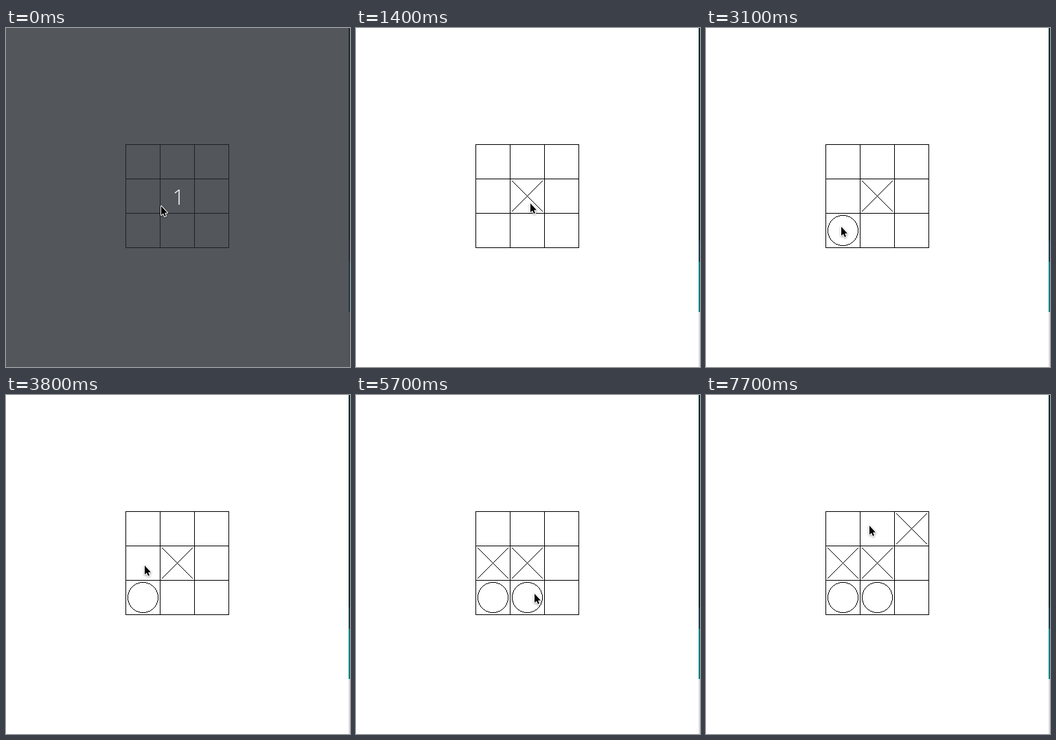
An HTML page with a canvas for the animation above (8 s loop, 501 by 493 pixels).

```html
<!DOCTYPE html>
<html lang="en">
<head>
<meta charset="utf-8">
<title>Noughts and crosses</title>
<style>
html, body { margin: 0; width: 100%; height: 100%; overflow: hidden; background: #fff; }
canvas { display: block; width: 501px; height: 493px; }
</style>
</head>
<body>
<canvas id="stage" width="501" height="493"></canvas>
<script>
const ctx = document.getElementById('stage').getContext('2d');
const LOOP = 8000, STEP = 100, INTRO = 100;
const LEFT = 174, TOP = 169, CELL = 50, REACH = 22;

// Pointer glides: start and end time, then where it comes to rest
const glides = [
  { from: 0, to: 0, x: 226, y: 259 },
  { from: 100, to: 500, x: 254, y: 255 },
  { from: 1800, to: 2300, x: 197, y: 289 },
  { from: 3400, to: 3800, x: 202, y: 248 },
  { from: 4800, to: 4900, x: 235, y: 269 },
  { from: 5000, to: 5400, x: 260, y: 289 },
  { from: 5900, to: 6500, x: 304, y: 193 },
  { from: 7300, to: 7700, x: 238, y: 190 }
];

// Cells are numbered row by row; crosses and noughts take turns
const moves = [
  { at: 1400, cell: 4 }, { at: 3100, cell: 6 }, { at: 4400, cell: 3 },
  { at: 5700, cell: 7 }, { at: 6900, cell: 2 }
];

const arrow = new Path2D('M0 0V13L3 10.4L5 15L7 14.2L5.1 9.7H9Z');

function box(color, x, y, w, h) {
  ctx.fillStyle = color;
  ctx.fillRect(x, y, w, h);
}

function dot(x, y) {
  ctx.fillRect(x, y, 1, 1);
}

function grid() {
  for (let i = 0; i < 4; i++) {
    box('#000', LEFT + i * CELL, TOP, 1, 3 * CELL + 1);
    box('#000', LEFT, TOP + i * CELL, 3 * CELL + 1, 1);
  }
}

function cross(cx, cy) {
  for (let i = -REACH; i <= REACH; i++) {
    dot(cx + i, cy + i);
    dot(cx + i, cy - i);
  }
}

// One-pixel circle without smoothing
function nought(cx, cy) {
  for (let a = 0; ; a++) {
    const b = Math.round(Math.sqrt(REACH * REACH - a * a));
    if (a > b) break;
    for (const sx of [-1, 1]) for (const sy of [-1, 1]) {
      dot(cx + sx * a, cy + sy * b);
      dot(cx + sx * b, cy + sy * a);
    }
  }
}

// Sliver of the desktop beside the window
function edge() {
  box('#dcdcdc', 499, 0, 2, 493);
  box('#008080', 499, 0, 2, 413);
  box('#1f3f4f', 499, 0, 2, 340);
  box('#03302f', 499, 0, 2, 309);
}

function countdown() {
  box('rgba(38,41,48,.79)', 0, 0, 501, 493);
  ctx.fillStyle = '#fff';
  ctx.font = '300 31px "Open Sans", "Noto Sans", sans-serif';
  ctx.fillText('1', 242.5, 257);
}

// The pointer moves in whole time steps
function pointerAt(t) {
  const now = Math.floor(t / STEP) * STEP;
  let { x, y } = glides[0];
  for (const g of glides.slice(1)) {
    const k = Math.min(1, Math.max(0, (now - g.from) / (g.to - g.from)));
    x += (g.x - x) * k;
    y += (g.y - y) * k;
  }
  return [x, y];
}

function pointer(x, y) {
  ctx.save();
  ctx.translate(x, y);
  ctx.lineWidth = 2;
  ctx.lineJoin = 'round';
  ctx.strokeStyle = '#fff';
  ctx.shadowColor = 'rgba(0,0,0,.4)';
  ctx.shadowBlur = 3;
  ctx.shadowOffsetY = 1;
  ctx.stroke(arrow);
  ctx.shadowColor = 'transparent';
  ctx.fillStyle = '#000';
  ctx.fill(arrow);
  ctx.restore();
}

function draw(t) {
  box('#fff', 0, 0, 501, 493);
  edge();
  grid();
  moves.forEach(({ at, cell }, i) => {
    if (t < at) return;
    const mark = i % 2 ? nought : cross;
    mark(LEFT + CELL * (cell % 3 + 0.5), TOP + CELL * (Math.floor(cell / 3) + 0.5));
  });
  if (t < INTRO) countdown();
  pointer(...pointerAt(t));
}

const start = performance.now();
function tick() {
  draw((performance.now() - start) % LOOP);
  requestAnimationFrame(tick);
}
tick();
</script>
</body>
</html>
```
